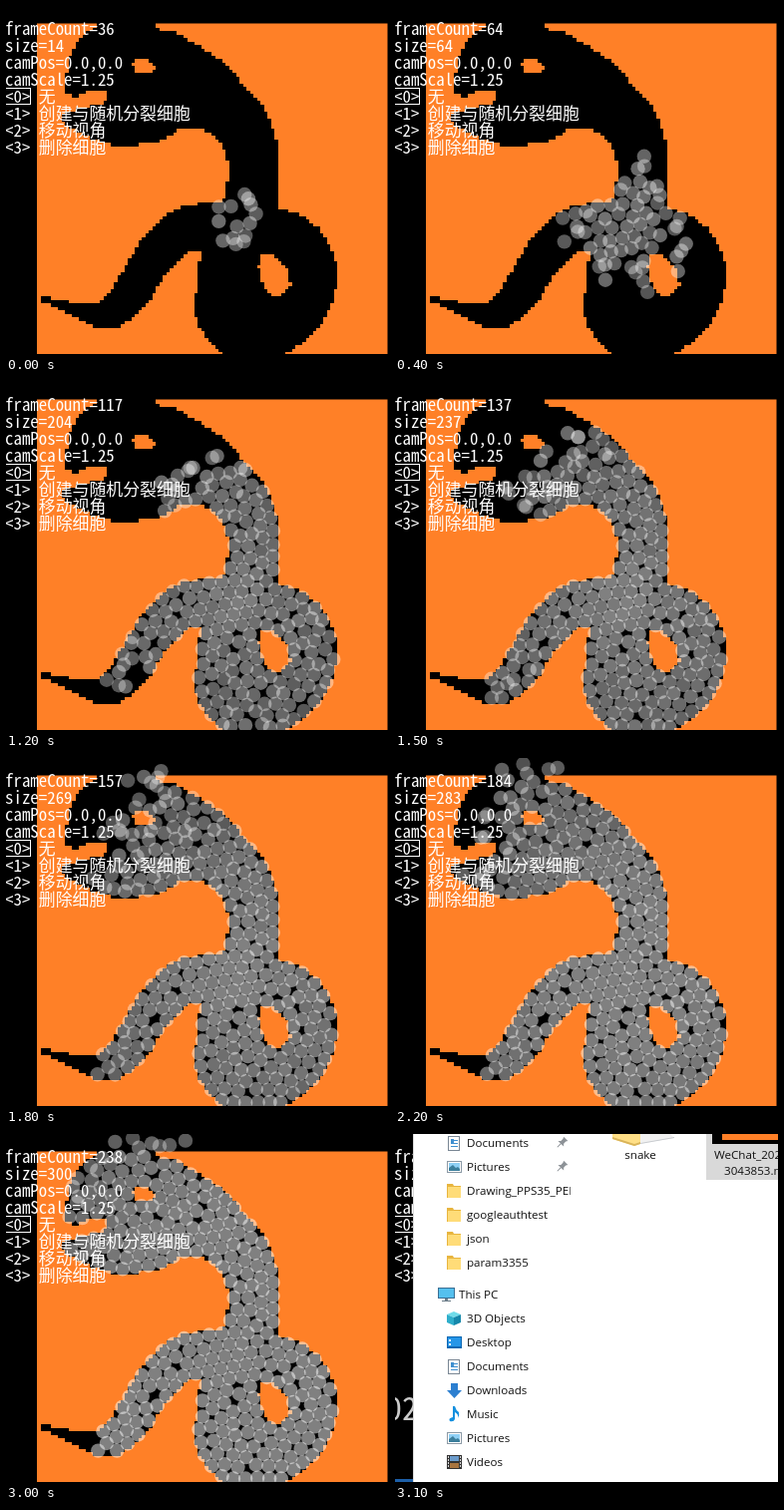
An HTML page with a canvas that plays this animation: 384x349 px, repeating every 3200 ms.

```html
<!DOCTYPE html>
<html lang="en">
<head>
<meta charset="utf-8">
<title>Cells filling a snake</title>
<style>
html, body { margin: 0; width: 100%; height: 100%; overflow: hidden; background: #000; }
canvas { display: block; width: 100vw; height: 100vh; }
</style>
</head>
<body>
<canvas id="stage" width="384" height="349"></canvas>
<script>
const W = 384, H = 349, LOOP = 3200, STEP = 100;
const ctx = document.getElementById('stage').getContext('2d');
const MONO = '"Noto Sans Mono CJK SC", "Noto Sans CJK SC", "Noto Sans Mono", monospace';
const UI = '"Open Sans", "Noto Sans", sans-serif';

// Progress of the simulation at a few steps
const STEPS = [0, 4, 8, 12, 18, 26, 30];
const COUNTS = [36, 64, 90, 117, 157, 211, 238];
const SIZES = [14, 64, 163, 204, 269, 296, 300];

function interp(x, xs, ys) {
  let i = 1;
  while (i < xs.length - 1 && x > xs[i]) i++;
  return ys[i - 1] + (ys[i] - ys[i - 1]) * (x - xs[i - 1]) / (xs[i] - xs[i - 1]);
}

let seed = 20211;
function rand() {
  seed = (seed + 0x6D2B79F5) | 0;
  let t = Math.imul(seed ^ (seed >>> 15), 1 | seed);
  t = (t + Math.imul(t ^ (t >>> 7), 61 | t)) ^ t;
  return ((t ^ (t >>> 14)) >>> 0) / 4294967296;
}

// Snake outline, then the loop hole and the eye
const snake = new Path2D(
  'M94 18 L148 18 L152 23 L170 26 L185 35 L205 47 L222 60 L235 75 L244 86 L256 98 L265 115' +
  ' L271 135 L273 160 L273 203 Q300 208 315 225 Q331 245 332 268 Q331 296 315 320' +
  ' Q300 338 274 352 L222 352 Q196 335 190 310 L189 293 L193 280 L192 262 L196 245 L184 245' +
  ' Q163 261 150 285 Q136 308 112 322 L95 323 L80 318 L62 308 L45 300 L34 297 L34 289' +
  ' L50 294 L70 298 L92 297 Q103 290 108 280 L130 243 Q146 218 170 203 Q190 197 218 195' +
  ' L222 175 L222 155 Q216 132 200 125 Q182 121 170 125 L160 133 L148 138 L108 140' +
  ' L98 137 L80 130 L62 122 L54 110 L72 102 L98 98 L102 86 L82 86 L70 92 L58 86 L60 72' +
  ' L63 52 L70 38 L82 26 Z' +
  ' M253 260 L257 250 L266 248 L275 256 L283 266 L285 279 L280 288 L270 291 L260 285 L254 273 Z' +
  ' M126 60 L130 54 L143 54 L149 61 L143 68 L132 67 Z');

// Pixel mask of the snake
const PX = 3.5, OX = 31, OY = 18, COLS = 101, ROWS = 95;
const mask = [];
for (let r = 0; r < ROWS; r++)
  for (let c = 0; c < COLS; c++)
    mask.push(ctx.isPointInPath(snake, OX + (c + .5) * PX, OY + (r + .5) * PX, 'evenodd'));

function gridIndex(x, y) {
  const c = Math.floor((x - OX) / PX), r = Math.floor((y - OY) / PX);
  return c < 0 || r < 0 || c >= COLS || r >= ROWS ? -1 : r * COLS + c;
}

// Cell centres keep a margin to the edge and leave the tail tip empty
const MARGIN = 5;
function livable(x, y) {
  if (x < 92 && y > 270) return false;
  for (let a = 0; a < 8; a++) {
    const t = a * Math.PI / 4;
    if (!mask[gridIndex(x + MARGIN * Math.cos(t), y + MARGIN * Math.sin(t))]) return false;
  }
  return true;
}

// Walking distance inside the snake from the first cell
function distances(x, y) {
  const dist = mask.map(() => Infinity);
  dist[gridIndex(x, y)] = 0;
  let queue = [gridIndex(x, y)];
  while (queue.length) {
    const next = [];
    for (const k of queue) {
      const c = k % COLS;
      for (let dy = -1; dy <= 1; dy++)
        for (let dx = -1; dx <= 1; dx++) {
          const n = k + dy * COLS + dx;
          if (c + dx < 0 || c + dx >= COLS || !mask[n]) continue;
          const d = dist[k] + PX * Math.hypot(dx, dy);
          if (d < dist[n] - 1e-6) { dist[n] = d; next.push(n); }
        }
    }
    queue = next;
  }
  return dist;
}

const gap = (a, b) => Math.hypot(a.x - b.x, a.y - b.y);

function scatter(total) {
  const list = [];
  while (list.length < total) {
    let best = null, far = -1;
    for (let tries = 0; tries < 12;) {
      const p = { x: OX + rand() * 305, y: OY + rand() * 328 };
      if (!livable(p.x, p.y)) continue;
      tries++;
      const d = list.reduce((m, q) => Math.min(m, gap(p, q)), 999);
      if (d > far) { far = d; best = p; }
    }
    list.push(best);
  }
  return list;
}

function relax(list, reach, rounds) {
  const shift = (p, dx, dy) => {
    if (livable(p.x + dx, p.y + dy)) { p.x += dx; p.y += dy; }
    else if (livable(p.x + dx, p.y)) p.x += dx;
    else if (livable(p.x, p.y + dy)) p.y += dy;
  };
  for (let n = 0; n < rounds; n++)
    for (let i = 1; i < list.length; i++)
      for (let j = 0; j < i; j++) {
        const a = list[i], b = list[j], d = gap(a, b);
        if (d >= reach || d === 0) continue;
        const f = .2 * (reach - d) / d, dx = (a.x - b.x) * f, dy = (a.y - b.y) * f;
        shift(a, dx, dy);
        shift(b, -dx, -dy);
      }
}

function makeCells() {
  const dist = distances(235, 218);
  const list = scatter(293);
  relax(list, 13.4, 160);
  for (const p of list) p.order = dist[gridIndex(p.x, p.y)] + (rand() - .5) * 44;
  list.sort((a, b) => a.order - b.order);
  // A few slip out over the top of the head
  [[133, 14], [154, 12], [164, 11], [109, 8], [127, 4], [147, 10], [180, 6]].forEach(
    ([x, y], i) => list.splice(256 + 6 * i, 0, { x, y, loose: true }));
  list.forEach((p, i) => {
    p.parent = p;
    let near = Infinity;
    for (let j = 0; j < i; j++)
      if (gap(p, list[j]) < near) { near = gap(p, list[j]); p.parent = list[j]; }
    p.birth = interp(i + 1, [1, ...SIZES], [4, ...COUNTS]);
    p.turn = rand() * 6.283;
    p.sway = 2 + rand() * 4;
    p.tint = rand() * .1;
  });
  return list;
}
const cells = makeCells();

function drawSnake() {
  ctx.fillStyle = '#ff8027';
  ctx.fillRect(OX, OY - .5, 351.5, H);
  ctx.fillStyle = '#000';
  mask.forEach((on, k) => {
    if (!on) return;
    const c = k % COLS, r = Math.floor(k / COLS);
    const x = Math.round(OX + c * PX), y = r ? Math.round(OY + r * PX) : OY - 1;
    ctx.fillRect(x, y, Math.round(OX + (c + 1) * PX) - x, Math.round(OY + (r + 1) * PX) - y);
  });
}

function drawCells(count, size) {
  for (const p of cells.slice(0, size)) {
    const age = Math.max(0, count - p.birth), grown = Math.min(1, age / 120);
    const k = 1 - .55 * Math.exp(-age / 12);
    const sway = p.sway * Math.exp(-age / 28), a = p.turn + age * .06;
    const x = p.parent.x + (p.x - p.parent.x) * k + sway * Math.cos(a);
    const y = p.parent.y + (p.y - p.parent.y) * k + sway * Math.sin(a);
    const young = .31 + p.tint;
    const alpha = p.loose ? young : young + (.5 - young) * grown;
    ctx.fillStyle = `rgba(255,255,255,${alpha})`;
    ctx.beginPath();
    ctx.arc(x, y, 7.2, 0, 7);
    ctx.fill();
  }
}

function drawInfo(count, size, x) {
  const lines = ['frameCount=' + count, 'size=' + size, 'camPos=0.0,0.0', 'camScale=1.25',
    '<0> 无', '<1> 创建与随机分裂细胞', '<2> 移动视角', '<3> 删除细胞'];
  ctx.font = '16.9px ' + MONO;
  ctx.fillStyle = ctx.strokeStyle = '#fff';
  ctx.lineWidth = 1;
  lines.forEach((s, i) => ctx.fillText(s, x, 29 + 17 * i));
  ctx.strokeRect(x + .5, 82.5, 25, 16);
}

function rect(color, x, y, w, h) {
  ctx.fillStyle = color;
  ctx.fillRect(x, y, w, h);
}
function shape(color, d) {
  ctx.fillStyle = color;
  ctx.fill(new Path2D(d));
}

// Icons, each drawn around its centre
const icons = {
  doc() {
    rect('#7a8794', -6, -7, 12, 15);
    rect('#fff', -5, -6, 10, 13);
    for (let y = -3; y < 6; y += 3) rect('#3f8fcf', -3, y, 7, 1);
    rect('#3f8fcf', -3, -4, 3, 4);
  },
  pic() {
    rect('#8c9aa6', -7, -6, 15, 12);
    rect('#fff', -6, -5, 13, 10);
    rect('#8fd0f5', -5, -4, 11, 8);
    shape('#3c7f9c', 'M-5 4 L-5 1 L-1 -2 L2 1 L4 0 L6 2 L6 4 Z');
  },
  folder() {
    shape('#e8b53f', 'M-7 -7 L-1 -7 L0 -5 L7 -5 L7 7 L-7 7 Z');
    rect('#ffdc78', -6, -4, 13, 11);
  },
  pc() {
    rect('#3b6f94', -9, -7, 17, 11);
    rect('#55c0ee', -8, -6, 15, 9);
    rect('#6d7d89', -2, 4, 3, 2);
    rect('#6d7d89', -5, 6, 9, 1);
  },
  cube() {
    shape('#6fdcea', 'M-7 -4 L0 -7 L7 -4 L0 -1 Z');
    shape('#2eaecb', 'M-7 -4 L0 -1 L0 7 L-7 4 Z');
    shape('#1588ab', 'M7 -4 L0 -1 L0 7 L7 4 Z');
  },
  desk() {
    rect('#0b67b2', -7, -6, 15, 12);
    rect('#2696e8', -6, -5, 13, 9);
    rect('#fff', -5, -3, 2, 2);
    rect('#fff', -5, 1, 2, 2);
  },
  down() { shape('#2c7fd0', 'M-3 -7 L4 -7 L4 0 L8 0 L0.5 8 L-7 0 L-3 0 Z'); },
  note() {
    shape('#1490df', 'M-1 -8 L1 -8 Q2 -4 5 -2 Q6 1 4 4 Q5 0 1 -2 L1 5 Q0 8 -4 7 Q-6 4 -1 3 Z');
  },
  film() {
    rect('#333', -7, -7, 15, 14);
    rect('#6c9ccc', -4, -6, 9, 5);
    rect('#a8743f', -4, 1, 9, 5);
    for (let y = -6; y < 6; y += 3) {
      rect('#ddd', -6, y, 1, 2);
      rect('#ddd', 6, y, 1, 2);
    }
  },
  disk() { rect('#8a949c', -7, -4, 15, 8); },
  pin() {
    ctx.rotate(Math.PI / 4);
    shape('#8d9297', 'M-3 -6 L3 -6 L2 -4 L2 -1 L4 1 L-4 1 L-2 -1 L-2 -4 Z M-.5 1 L.5 1 L.5 6 L-.5 6 Z');
  }
};
function icon(name, x, y) {
  ctx.save();
  ctx.translate(x, y);
  icons[name]();
  ctx.restore();
}

const tree = [
  ['doc', 'Documents', 9], ['pic', 'Pictures', 33], ['folder', 'Drawing_PPS35_PEE', 57],
  ['folder', 'googleauthtest', 81], ['folder', 'json', 105], ['folder', 'param3355', 129],
  ['pc', 'This PC', 161], ['cube', '3D Objects', 185], ['desk', 'Desktop', 209],
  ['doc', 'Documents', 233], ['down', 'Downloads', 257], ['note', 'Music', 281],
  ['pic', 'Pictures', 305], ['film', 'Videos', 329], ['disk', 'Local Disk (C:)', 353]
];

function drawExplorer() {
  drawInfo(238, 300, -1);
  ctx.font = '300 32px ' + MONO;
  ctx.fillStyle = '#ccc';
  ctx.fillText('02', -9, 287);
  rect('#1c5fa8', 0, 346, 19, 3);
  rect('#fff', 19, 0, W - 19, H);
  rect('#d8d8d8', 18, 0, 1, H);

  ctx.font = '11.6px ' + UI;
  ctx.save();
  ctx.beginPath();
  ctx.rect(19, 0, 157, H);
  ctx.clip();
  for (const [name, label, y] of tree) {
    const root = name === 'pc';
    icon(name, root ? 52 : 59, y);
    ctx.fillStyle = '#111';
    ctx.fillText(label, root ? 64 : 72, y + 4);
  }
  icon('pin', 167, 9);
  icon('pin', 167, 33);
  ctx.restore();

  // Folder with a sheet sticking out
  shape('#ffdf86', 'M218 0 L246 0 L246 10 L240 12 L218 5 Z');
  shape('#f1f1f1', 'M246 0 L276 0 L280 4 L246 10 Z');
  shape('#d9b45a', 'M218 5 L240 12 L246 10 L246 8 L240 10 L218 3 Z');
  shape('#c9ccd0', 'M246 9 L280 3 L280 4 L246 10 Z');
  ctx.fillStyle = '#111';
  ctx.textAlign = 'center';
  ctx.fillText('snake', 246, 25);
  ctx.textAlign = 'left';

  // Selected file
  rect('#d9d9d9', 312, 0, 72, 46);
  rect('#000', 318, 0, 66, 10);
  rect('#ff8027', 328, 0, 56, 6);
  ctx.fillStyle = '#111';
  ctx.fillText('WeChat_202', 320, 25);
  ctx.fillText('3043853.mp4', 330, 41);
}

function render(n) {
  rect('#000', 0, 0, W, H);
  if (n === 31) return drawExplorer();
  const count = Math.round(interp(n, STEPS, COUNTS));
  const size = Math.round(interp(n, STEPS, SIZES));
  drawSnake();
  drawCells(count, size);
  drawInfo(count, size, -1);
}

const start = performance.now();
let shown = -1;
function tick() {
  const n = Math.floor(((performance.now() - start) % LOOP) / STEP);
  if (n !== shown) render(shown = n);
  requestAnimationFrame(tick);
}
tick();
</script>
</body>
</html>
```
